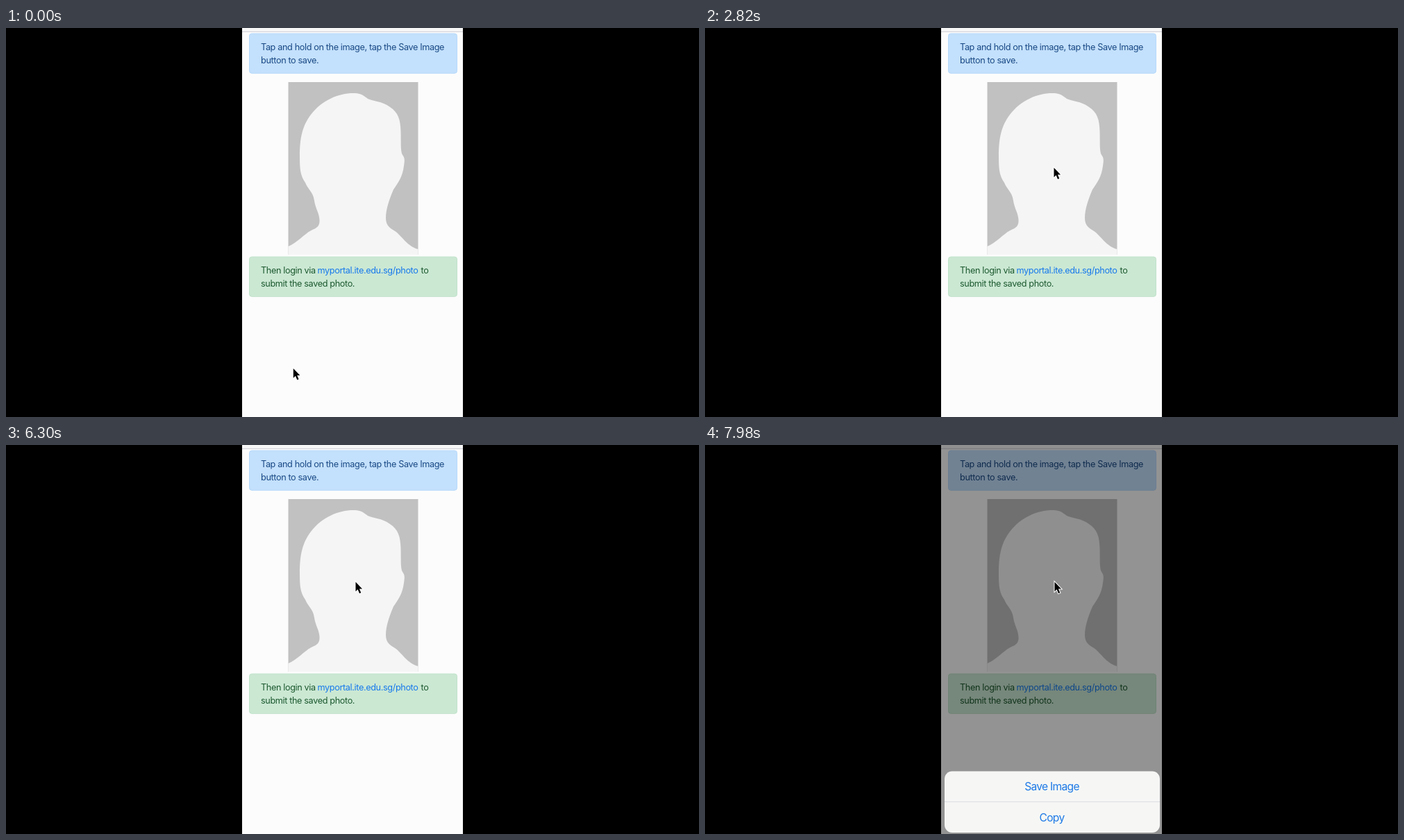
Recreate the animation shown at these times as an HTML page. Size 998 by 561 pixels, loop 8 s.

```html
<!DOCTYPE html>
<html lang="en">
<head>
<meta charset="utf-8">
<title>Save the photo</title>
<style>
  html, body { margin: 0; height: 100%; overflow: hidden; background: #000; }
  svg { display: block; width: 100vw; height: 100vh; }
  text { font: 12.7px Inter, "Open Sans", sans-serif; letter-spacing: -.03em; }
  .info { fill: #1a4a85; }
  .success { fill: #1d5a30; }
  .link { fill: #1679ec; }
  #sheet text { font-size: 15.6px; letter-spacing: -.045em; text-anchor: middle; fill: #1d79e6; }
</style>
</head>
<body>
<svg viewBox="0 0 998 561">
  <rect width="998" height="561"/>
  <rect x="340" width="318" height="561" fill="#fcfcfc"/>
  <rect x="340" width="318" height="5" fill="#f7f7f8"/>
  <rect x="340" y="4.8" width="318" height="1" fill="#cdcdd3"/>

  <rect x="350.5" y="8" width="299" height="57.3" rx="3.5" fill="#c3e0fc" stroke="#b7d9fb"/>
  <text class="info" x="367" y="32">Tap and hold on the image, tap the Save Image</text>
  <text class="info" x="367" y="50.7">button to save.</text>

  <rect x="406.5" y="78" width="187" height="249" fill="#c1c1c1"/>
  <path fill="#f4f5f4" d="M406.5 315 C418 310 425 302 434 295.5 C442 289 451 290 451.5 279
    C452 268 446 262 444 249 C442 236 435 233 431 223 C424 213 423 204 423 185
    C423 158 427 141 439 125 C455 104 479 94 500 94 C512 94 515 98 521 102
    C529 106 541 105 553 114 C565 122 568 132 568.5 149 C569 162 568 174 570 181
    C573 187 575 186 573 199 C571 214 566 221 558 233 C553 245 547 260 547 274
    C547 286 554 289 561 293.5 C570 300 578 315 593.5 319 V327 H406.5 Z"/>

  <rect x="350.5" y="330" width="299" height="57.3" rx="3.5" fill="#cbe8d3" stroke="#c1e3cb"/>
  <text class="success" x="367" y="354">Then login via</text>
  <text class="link" x="448.5" y="354">myportal.ite.edu.sg/photo</text>
  <text class="success" x="597.5" y="354">to</text>
  <text class="success" x="367" y="372.8">submit the saved photo.</text>

  <rect id="dim" x="340" width="318" height="561" opacity="0"/>
  <g id="sheet">
    <rect x="345" y="470.5" width="310" height="88.5" rx="11" fill="#f6f7f5"/>
    <rect x="345" y="514.3" width="310" height=".8" fill="#d3d4da"/>
    <text x="499.5" y="498.3">Save Image</text>
    <text x="499.5" y="543">Copy</text>
  </g>
  <path id="cursor" d="M0 0 V13.7 L3.1 10.8 L5.5 16.5 L7.8 15.5 L5.4 10 H9.6 Z"
    stroke="#fff" stroke-width="2" paint-order="stroke"/>
</svg>
<script>
  const LOOP = 8000, SHEET_TRAVEL = 175;
  const [dim, sheet, cursor] = ["dim", "sheet", "cursor"].map(id => document.getElementById(id));

  const progress = (t, start, end) => Math.min(1, Math.max(0, (t - start) / (end - start)));
  const easeInOut = p => p * p * (3 - 2 * p);
  const easeOut = p => 1 - (1 - p) ** 2;

  function render(t) {
    const glide = easeInOut(progress(t, 300, 1500));
    const nudge = easeInOut(progress(t, 3000, 3300));
    const x = 413.8 + 88.7 * glide + nudge;
    const y = 491 - 289.5 * glide - 4 * nudge;
    cursor.setAttribute("transform", `translate(${x} ${y})`);

    const open = easeOut(progress(t, 7380, 7800));
    dim.setAttribute("opacity", 0.42 * open);
    sheet.setAttribute("transform", `translate(0 ${SHEET_TRAVEL * (1 - open)})`);
  }

  const origin = performance.now();
  function tick() {
    render((performance.now() - origin) % LOOP);
    requestAnimationFrame(tick);
  }
  tick();
</script>
</body>
</html>
```
